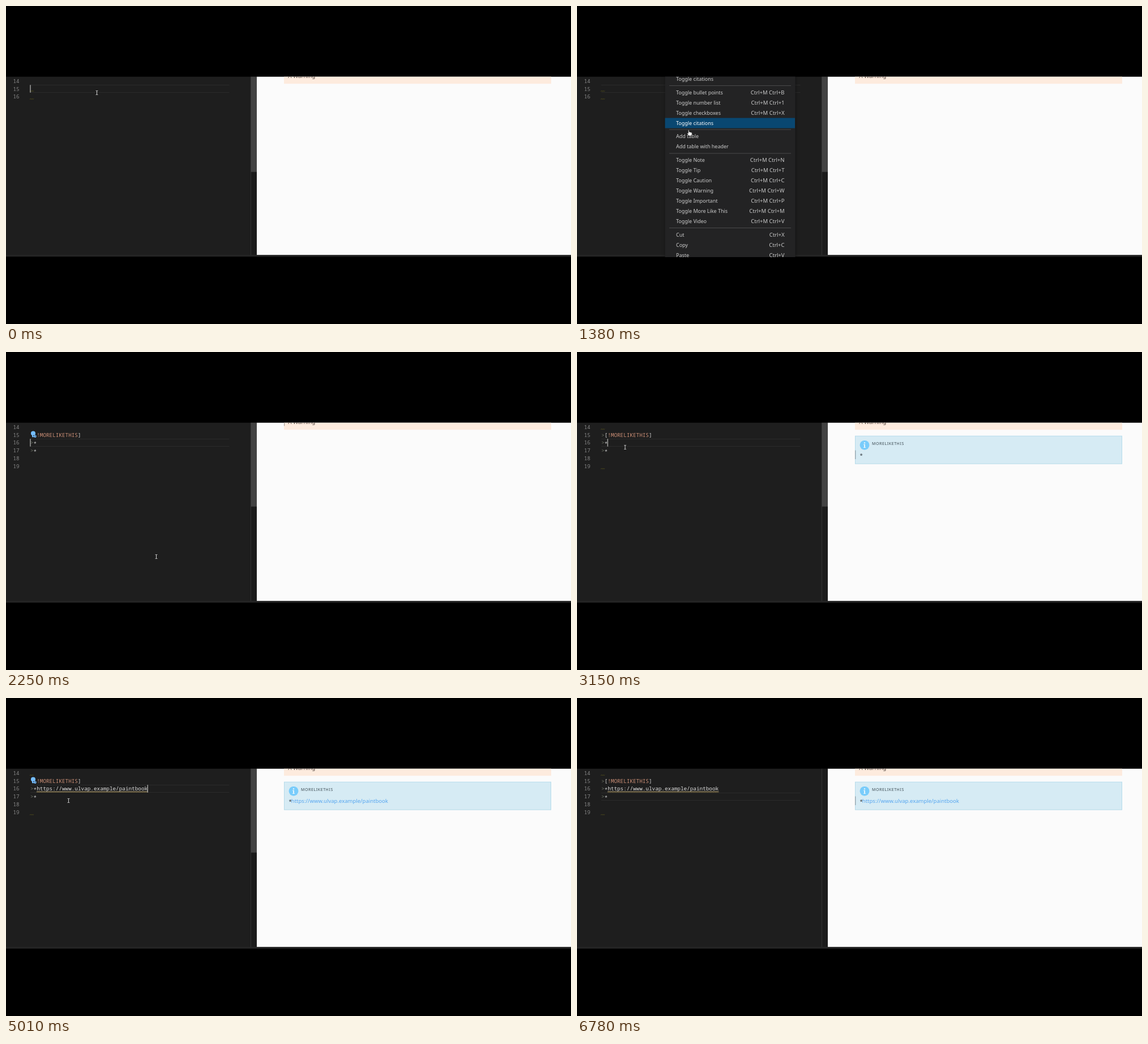
Animation of 998 by 561 pixels, one loop 6870 ms. Source, as an HTML page with a canvas:

```html
<!DOCTYPE html>
<html lang="en">
<head>
<meta charset="utf-8">
<title>Markdown alert</title>
<style>
  html, body { margin: 0; width: 100%; height: 100%; overflow: hidden; background: #000; }
  canvas { display: block; width: 998px; height: 561px; }
</style>
</head>
<body>
<canvas id="stage" width="998" height="561"></canvas>
<script>
const ctx = document.getElementById('stage').getContext('2d');
const LOOP = 6870, TICK = 30;
const MONO = '9.33px "Noto Sans Mono", "DejaVu Sans Mono", monospace';
const CHAR = 5.6, TEXT_X = 43;
const LINK = 'https://www.ulvap.example/paintbook';

// Moments of the story, in ms
const MENU_IN = 750, HOVER = 1290, MENU_OUT = 2070, INSERT = 2130, BULB_IN = 2220,
  ALERT = 2640, CLICK = 3150, PASTE = 4290, RENDER = 4620, BULB_2 = 4740,
  CLICK_2 = 5250, GONE = 5610, FADE = 5730;

const MOUSE = [
  [1260, 160.5, 153], [1380, 197, 218], [1650, 266, 356], [1950, 265.5, 361],
  [2280, 265.5, 361], [2730, 97, 182], [2820, 97, 182], [3150, 85, 168],
  [4500, 85, 168], [4950, 110.5, 181], [5040, 110.5, 181], [5220, 102, 176],
  [5280, 106, 177], [5580, 774, 207]
];
// Times at which the caret turns on and off
const CARET = [[0, 180], [480, 750], [2130, 2430], [2730, 3030], [3150, 3450],
  [3750, 4050], [4290, 4590], [4890, 5850], [6150, 6750]];

const MENU = [
  [129, 'Toggle citations'],
  [152.5, 'Toggle bullet points', 'M', 'B'],
  [170.5, 'Toggle number list', 'M', '1'],
  [188.5, 'Toggle checkboxes', 'M', 'X'],
  [206.5, 'Toggle citations'],
  [230, 'Add table'],
  [248, 'Add table with header'],
  [272, 'Toggle Note', 'M', 'N'],
  [290, 'Toggle Tip', 'M', 'T'],
  [308, 'Toggle Caution', 'M', 'C'],
  [326, 'Toggle Warning', 'M', 'W'],
  [344, 'Toggle Important', 'M', 'P'],
  [362, 'Toggle More Like This', 'M', 'M'],
  [380, 'Toggle Video', 'M', 'V'],
  [404, 'Cut', 'X'],
  [421.7, 'Copy', 'C'],
  [439.7, 'Paste', 'V']
];

const sans = size => size + 'px "Noto Sans", "Open Sans", sans-serif';
const lineTop = n => 139.3 + (n - 15) * 13.93;
const between = (t, a, b) => t >= a && t < b;
const clamp = v => Math.max(0, Math.min(1, v));

function rect(x, y, w, h, color) {
  ctx.fillStyle = color;
  ctx.fillRect(x, y, w, h);
}

function text(str, x, y, font, color, align = 'left', spacing = '0px') {
  ctx.font = font;
  ctx.fillStyle = color;
  ctx.textAlign = align;
  ctx.letterSpacing = spacing;
  ctx.fillText(str, x, y);
}

function path(points, fill, stroke, width = 1, close = true) {
  ctx.beginPath();
  points.forEach(([x, y]) => ctx.lineTo(x, y));
  if (close) ctx.closePath();
  if (fill) { ctx.fillStyle = fill; ctx.fill(); }
  if (stroke) { ctx.strokeStyle = stroke; ctx.lineWidth = width; ctx.stroke(); }
}

function circle(x, y, r, color) {
  ctx.beginPath();
  ctx.arc(x, y, r, 0, Math.PI * 2);
  ctx.fillStyle = color;
  ctx.fill();
}

function code(str, line, col, color, dy = 0) {
  text(str, TEXT_X + col * CHAR, lineTop(line) + 10.2 + dy, MONO, color);
}

function squiggle(x, y, w, color) {
  const points = [];
  for (let i = 0; i * 1.4 <= w; i++) points.push([x + i * 1.4, y + (i % 2 ? -1 : 0.6)]);
  path(points, null, color, 0.7, false);
}

function mouseAt(t) {
  if (t <= MOUSE[0][0]) return MOUSE[0].slice(1);
  for (let i = 1; i < MOUSE.length; i++) {
    const [t0, x0, y0] = MOUSE[i - 1], [t1, x1, y1] = MOUSE[i];
    if (t <= t1) {
      const k = (t - t0) / (t1 - t0);
      return [x0 + (x1 - x0) * k, y0 + (y1 - y0) * k];
    }
  }
  return MOUSE[MOUSE.length - 1].slice(1);
}

function bulb() {
  rect(43, 140, 11, 12.5, '#1e1e1e');
  circle(48, 143.4, 4, '#75beff');
  rect(46, 146, 4, 4.2, '#75beff');
  circle(51.6, 148.8, 2.2, '#75beff');
  rect(48.2, 146.6, 1.2, 2, '#1e1e1e');
  rect(51.2, 147.8, 1.3, 1.3, '#1e1e1e');
}

function drawEditor(t) {
  const inserted = t >= INSERT, pasted = t >= PASTE;
  const line = t < INSERT ? 15 : t < CLICK_2 ? 16 : 17;
  rect(0, 124.5, 443, 315, '#1e1e1e');
  rect(432, 124.5, 1, 315, '#303030');
  rect(433, 124.5, 10, 315, '#1b1b1b');
  ctx.globalAlpha = 1 - clamp((t - FADE + TICK) / 120);
  rect(432.5, 124.5, 10.5, (inserted ? 272.7 : 292.7) - 124.5, '#424242');
  ctx.globalAlpha = 1;

  for (let n = 14; n <= (inserted ? 19 : 16); n++)
    text(n, 23.6, lineTop(n) + 10.2, MONO, '#858585', 'right');

  const top = lineTop(line);
  rect(TEXT_X, Math.round(top), 351.5, 1, '#2b2b2b');
  rect(TEXT_X, Math.round(top + 13), 351.5, 1, '#2b2b2b');

  const marks = !inserted ? [15, 16] : t >= ALERT ? [14, 19] : [];
  marks.forEach(n => squiggle(42, lineTop(n) + 11, 7, '#5c5a1c'));

  if (inserted) {
    for (let n = 15; n <= 17; n++) code('>', n, 0, '#6c7264');
    code('[', 15, 1, '#d4d4d4');
    code('!MORELIKETHIS', 15, 2, '#ce9178');
    code(']', 15, 15, '#d4d4d4');
    code('*', 16, 1, '#d4d4d4', 1.5);
    code('*', 17, 1, '#d4d4d4', 1.5);
  }
  if (pasted) {
    code(LINK, 16, 2, '#dedede');
    rect(54, 164.7, 196.5, 0.8, '#b5ad98');
    if (t >= RENDER) squiggle(54, 166, 196, '#b3954a');
  }
  if (between(t, BULB_IN, CLICK) || between(t, BULB_2, CLICK_2)) bulb();

  if (CARET.some(([on, off]) => between(t, on, off))) {
    const col = t < CLICK ? 0 : between(t, PASTE, CLICK_2) ? 2 + LINK.length : 2;
    rect(TEXT_X + col * CHAR - 0.6, top, 1.2, 13.5, '#c0c0be');
  }
}

function drawPreview(t) {
  rect(443, 124.5, 555, 315, '#fbfbfb');
  rect(491, 124.5, 472, 12.7, '#fdebde');
  text('A Warning', 498.3, 127, sans(9.8), '#4f433c');
  if (between(t, INSERT, ALERT)) rect(491, 124.5, 1.2, 6, '#a9a29d');
  if (t < ALERT) return;

  rect(491, 147.7, 472, 50, '#b6dbea');
  rect(492, 148.7, 470, 48, '#d6ebf4');
  circle(508, 164.3, 8.4, '#79ccfb');
  circle(508, 160.3, 1.2, '#e2f3fc');
  rect(507, 162.7, 2, 6, '#e2f3fc');
  rect(506, 162.7, 2, 1, '#e2f3fc');
  rect(506, 168, 4, 1, '#e2f3fc');
  text('MORELIKETHIS', 521, 164.4, sans(7), '#3c4a52', 'left', '0.6px');
  text('*', 499.6, 186, sans(9.5), '#30373b');
  if (t >= RENDER) text(LINK, 503.8, 185.4, sans(9.5), '#55a5f0');
  if (between(t, CLICK, RENDER) || t >= CLICK_2) rect(491, 173.5, 1.4, 15.5, '#93a5ae');
}

function drawMenu(t) {
  ctx.save();
  ctx.globalAlpha = clamp((t - MENU_IN + TICK) / 110);
  ctx.shadowColor = 'rgba(0,0,0,.45)';
  ctx.shadowBlur = 6;
  rect(155.5, 110, 230, 350, '#232324');
  ctx.shadowBlur = 0;
  const hoverY = mouseAt(t - 25)[1];
  // The last row reached stays lit while the pointer crosses a separator
  const lit = t < HOVER ? -1 : MENU.findLastIndex(([y]) => hoverY >= y - 9);
  MENU.forEach(([y, label, key, second], i) => {
    const color = i === lit ? '#ffffff' : '#cccccc';
    if (i === lit) rect(155.5, y - 9, 229.5, 18, '#094771');
    text(label, 175, y + 3.3, sans(8.95), color);
    if (key) {
      const keys = 'Ctrl+' + key + (second ? ' Ctrl+' + second : '');
      text(keys, 366.5, y + 3.3, sans(9.5), color, 'right');
    }
  });
  [140, 217.5, 259.5, 391].forEach(y => rect(163, y, 215, 1, '#4a4a4b'));
  ctx.restore();
}

function drawMouse(t) {
  if (t >= GONE) return;
  const [x, y] = mouseAt(t);
  ctx.save();
  ctx.translate(x, y);
  ctx.lineJoin = 'round';
  if (between(t, MENU_IN + TICK, MENU_OUT)) {
    path([[-0.8, 0], [0.8, 0], [1.2, 4], [4.8, 4.8], [6.4, 6], [6, 9], [5, 11.2],
      [0.6, 11.2], [-2.6, 7], [-2, 5.8], [-0.6, 6.6]], '#f4f4f4', '#1a1a1a', 0.8);
  } else if (x > 443) {
    path([[0, 0], [0, 10], [2.4, 7.8], [4, 11], [5.4, 10.3], [3.9, 7.2], [7, 7]],
      '#ffffff', '#333333', 0.8);
  } else {
    rect(-0.5, -3.5, 1, 7, '#d0d0d0');
    rect(-2, -4, 4, 0.9, '#b8b8b8');
    rect(-2, 3.1, 4, 0.9, '#b8b8b8');
  }
  ctx.restore();
}

function draw(t) {
  rect(0, 0, 998, 561, '#000000');
  ctx.save();
  ctx.beginPath();
  ctx.rect(0, 124.5, 998, 318.5);
  ctx.clip();
  drawEditor(t);
  drawPreview(t);
  rect(0, 439.3, 998, 3.2, '#1c1c1c');
  rect(0, 439.5, 998, 1, '#343434');
  if (between(t, MENU_IN, MENU_OUT)) drawMenu(t);
  drawMouse(t);
  ctx.restore();
}

const start = performance.now();
function tick() {
  const t = (performance.now() - start) % LOOP;
  draw(Math.floor(t / TICK) * TICK);
  requestAnimationFrame(tick);
}
tick();
</script>
</body>
</html>
```
